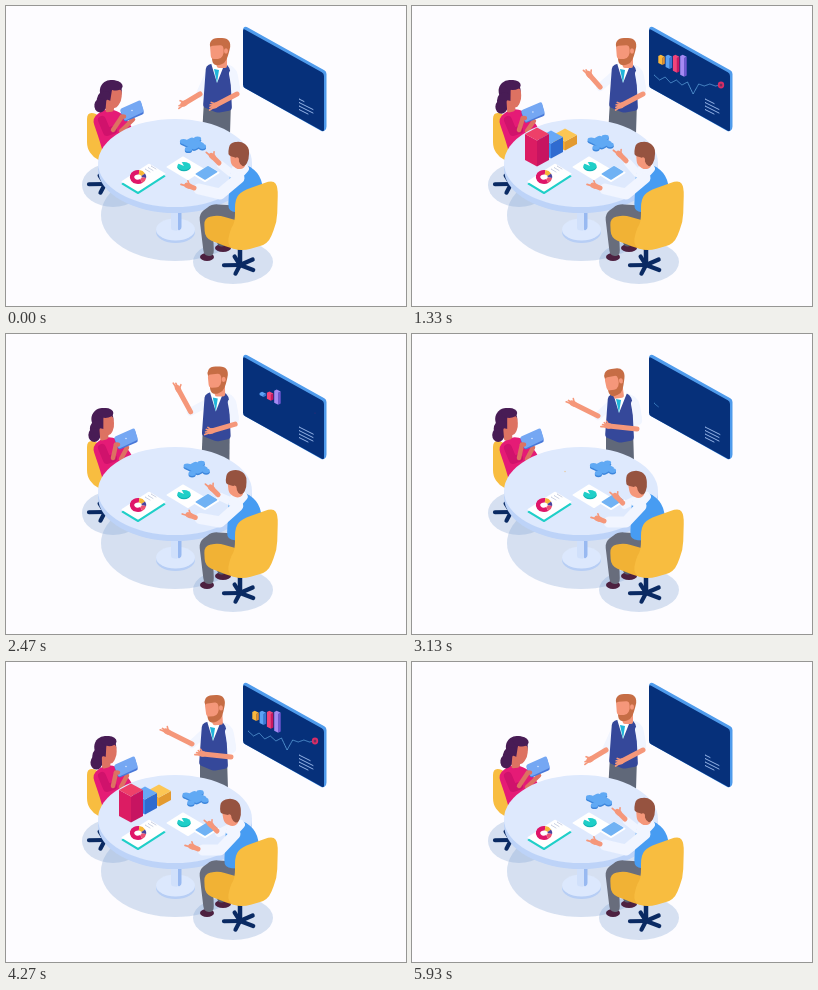
Animation, 400 px wide and 300 px high, one loop 6000 ms. Source, as an HTML page with a canvas:

```html
<!DOCTYPE html>
<html lang="en">
<head>
<meta charset="utf-8">
<title>Team meeting</title>
<style>
html, body { margin: 0; width: 100%; height: 100%; overflow: hidden; background: #fdfcff; }
canvas { display: block; width: 400px; height: 300px; }
</style>
</head>
<body>
<canvas id="stage"></canvas>
<script>
const LOOP = 6000, CHART_LOOP = 3000, TAU = Math.PI * 2;
const canvas = document.getElementById('stage');
const ratio = window.devicePixelRatio || 1;
canvas.width = 400 * ratio;
canvas.height = 300 * ratio;
const ctx = canvas.getContext('2d');

const SKIN = '#f5977a', TAN = '#dd7262', WHITE = '#ffffff', SHIRT = '#f1f5ff';
const NAVY = '#0a2a63', YELLOW = '#f8bd40', BLUE = '#479cf2', TEAL = '#1fcfc8';
const HAIR = '#c66d45', PLUM = '#481c55', BROWN = '#965340';

const clamp = v => Math.max(0, Math.min(1, v));
const smooth = v => v * v * (3 - 2 * v);
const ramp = (t, from, to) => smooth(clamp((t - from) / (to - from)));
const pulse = (t, on, full, fade, off) => ramp(t, on, full) * (1 - ramp(t, fade, off));
const mix = (a, b, k) => Array.isArray(a) ? a.map((v, i) => mix(v, b[i], k)) : a + (b - a) * k;

// Filled polygon whose corners are softened by r.
function shape(color, r, ...points) {
  const toward = (p, q) => mix(p, q, Math.min(.5, r / Math.hypot(q[0] - p[0], q[1] - p[1])));
  const n = points.length;
  ctx.beginPath();
  points.forEach((p, i) => {
    ctx.lineTo(...toward(p, points[(i + n - 1) % n]));
    ctx.quadraticCurveTo(...p, ...toward(p, points[(i + 1) % n]));
  });
  ctx.closePath();
  ctx.fillStyle = color;
  ctx.fill();
}

function oval(x, y, rx, ry, color) {
  ctx.beginPath();
  ctx.ellipse(x, y, rx, ry, 0, 0, TAU);
  ctx.fillStyle = color;
  ctx.fill();
}

function stroke(width, color, ...points) {
  ctx.beginPath();
  points.forEach(p => ctx.lineTo(...p));
  ctx.lineWidth = width;
  ctx.lineCap = ctx.lineJoin = 'round';
  ctx.strokeStyle = color;
  ctx.stroke();
}

function at(x, y, turn, draw) {
  ctx.save();
  ctx.translate(x, y);
  ctx.rotate(turn);
  draw();
  ctx.restore();
}

// Flat sheet on the table: a runs up to the right, b down to the right.
function sheet(x, y, a, b, color) {
  shape(color, 1, [x, y], [x + a, y - a * .64], [x + a + b, y - a * .64 + b * .6], [x + b, y + b * .6]);
}

function forearm(elbow, wrist, color, fingers) {
  stroke(5, color, elbow, wrist);
  const angle = Math.atan2(wrist[1] - elbow[1], wrist[0] - elbow[0]);
  at(...wrist, angle, () => {
    oval(1, 0, 4, 2.8, color);
    for (let i = 0; i < fingers; i++)
      stroke(1.7, color, [2, i - 1], [8 - i * 1.5, i * 2.2 - 1.5]);
    stroke(1.6, color, [0, 1], [3, 4.5]);
  });
}

function chairBase(x, y) {
  stroke(4.5, NAVY, [x, y - 17], [x, y]);
  for (let i = 0; i < 5; i++) {
    const a = .6 + i * TAU / 5;
    stroke(4.2, NAVY, [x, y], [x + 16 * Math.cos(a), y + 9 * Math.sin(a)]);
  }
}

// Screen

const HEIGHTS = [69, 74, 71, 77, 74, 79, 76, 88, 78, 80, 78, 80, 79];

function chartPoint(u) {
  const pos = u * (HEIGHTS.length - 1), i = Math.min(Math.floor(pos), HEIGHTS.length - 2);
  return [242 + 67 * u, mix(HEIGHTS[i], HEIGHTS[i + 1], pos - i)];
}

function bars(c) {
  const colors = [['#fbb83c', '#e58e2c'], ['#5ba2f5', '#3b75d4'], ['#f2457a', '#cb175f'], ['#a58af3', '#7257d2']];
  colors.forEach(([front, side], i) => {
    const grown = pulse(c, 150 + i * 40, 800 + i * 60, 2180 + i * 50, 2500 + i * 60);
    const x = 246.3 + i * 7.3, y = 57 + i * 3.9, top = y - (7 + i * 3.9) * grown;
    if (grown < .03) return;
    shape(side, 0, [x + 4, y + 2], [x + 6.5, y + .8], [x + 6.5, top + .8], [x + 4, top + 2]);
    shape(front, 0, [x, y], [x + 4, y + 2], [x + 4, top + 2], [x + 6.5, top + .8], [x + 2.5, top - 1.2], [x, top]);
  });
}

function screen(t, c) {
  shape('#4f9bec', 2.5, [237, 21.5], [240, 20.5], [320.5, 65.5], [320.5, 123], [317, 126], [237, 81]);
  shape('#06307a', 2.5, [237, 22.5], [318, 67.5], [318, 126], [237, 81]);
  bars(c);

  const head = clamp((c - 90) / 660), tail = clamp((c - 1760) / 680);
  if (head > tail) {
    const points = [];
    for (let i = 0; i <= 96; i++) points.push(chartPoint(mix(tail, head, i / 96)));
    stroke(.8, '#5fa3dc', ...points);
  }
  const dot = pulse(c, 730, 900, 2350, 2500);
  if (dot) {
    oval(309, 79, 3.2 * dot, 3.4 * dot, '#d82d67');
    oval(309, 79, 1.4 * dot, 1.5 * dot, '#71305f');
  }

  for (let i = 0; i < 4; i++) {
    const y = 93 + i * 3.5;
    const w = i === 0 ? 10 - 5 * Math.cos(t / LOOP * TAU) : i === 3 ? 9 : 14;
    stroke(.9, '#a3c1f2', [293, y], [293 + w, y + w * .5]);
  }
}

// People

function presenter(t) {
  const up = pulse(t, 1000, 1600, 2250, 2850), side = pulse(t, 2250, 2850, 4450, 5050);
  const pose = (low, high, left) => low.map((v, i) => v + (high[i] - v) * up + (left[i] - v) * side);
  const dx = -4 * side, dy = 2 * side;
  const elbow = pose([194, 88], [184, 76], [186, 82]);

  shape('#606879', 0, [198 + dx, 95], [225 + dx, 95], [224 + dx / 2, 128], [196 + dx / 2, 128]);
  stroke(8, SHIRT, [203 + dx, 68 + dy], elbow);
  forearm(elbow, pose([179, 97], [177, 49], [162, 70]), SKIN, 2);

  at(dx, dy, 0, () => {
    shape(SHIRT, 6, [200, 60], [222, 57], [231, 64], [235, 88], [225, 91], [200, 84]);
    shape('#35489a', 3, [200, 60], [207, 57], [219, 57], [224, 62], [226, 104], [212, 107], [197, 101]);
    shape(WHITE, 0, [205, 57], [219, 57], [211, 77]);
    shape('#20b5da', 0, [208, 63], [213, 64], [211, 77]);
    stroke(8, SHIRT, [227, 68], [230, 84]);
  });
  forearm(mix([231, 88], [225, 95], side), mix([210, 99], [197, 92], side), SKIN, 3);

  const lean = side * (8 + 3 * Math.cos((t - 3130) / 365));
  at(213 - lean, 45 + lean * .25, -lean * .012, () => {
    shape(SKIN, 2, [-4, 6], [8, 5], [8, 17], [-2, 17]);
    shape(HAIR, 5, [-10, -7], [-6, -13], [8, -13], [12, -7], [9, 5], [6, 12], [-2, 15], [-7, 12], [-7, 0]);
    shape(SKIN, 3, [-9, -5], [4, -6], [5, 2], [2, 8], [-8, 8]);
    oval(7, 0, 2, 2.7, SKIN);
  });
}

function woman(t) {
  // Her gestures mirror around the start of the loop.
  const u = Math.min(t, LOOP - t);
  const hx = 105 - 8 * ramp(u, 100, 700) + 3 * ramp(u, 900, 1750) - 5 * ramp(u, 1900, 3000);
  const lowered = pulse(u, 150, 620, 850, 1500);
  const lean = ramp(hx, 97, 105);
  const x = 119 + 6 * Math.max(1 - ramp(u, 100, 1700), lowered * .9), y = 104.5 + 9 * lowered;

  chairBase(99, 178);
  shape(YELLOW, 6, [81, 107], [90, 107], [100, 118], [100, 158], [87, 151], [81, 142]);
  shape('#e51b76', 7, [86, 112], [100, 102], [115, 106], [128, 124], [122, 150], [98, 150], [94, 136]);
  at(hx, 90, lean * .16, () => {
    oval(-1, -5, 11, 11, PLUM);
    oval(-6, 5, 7.5, 9, PLUM);
    oval(-9, 11, 6, 7, PLUM);
    shape(TAN, 2, [-4, 4], [5, 6], [5, 15], [-3, 17]);
    shape(TAN, 4, [0, -9], [10, -8], [11, 3], [7, 12], [0, 10]);
    oval(2, -11, 8, 5, PLUM);
  });

  stroke(8, '#d0126c', [96, 114], [101, 126], [107, 124]);
  stroke(4.5, TAN, [107, 124], [x - 9, y + 6]);
  stroke(4.5, TAN, [115, 125], [x + 2, y + 9]);
  at(x, y, lowered * .14 - .06, () => {
    shape('#4978d8', 2, [-11, -1], [10, -9], [13, 4], [-7, 11]);
    shape('#75a7f3', 2, [-11, -2], [10, -10], [13, 2], [-7, 10]);
    oval(1, 0, .8, .8, '#d8e7ff');
  });
  oval(x - 8, y + 6, 3.2, 2.3, TAN);
}

function seatedMan(t) {
  const write = pulse(t, 2250, 2850, 5300, 5850);
  const wave = pulse(t, 200, 670, 1000, 1700);
  const scribble = Math.sin(t / 500 * Math.PI) * write;
  const lean = -4 * write;

  oval(201, 251, 7, 4, '#4d2140');
  oval(217, 242, 8, 4, '#4d2140');
  shape('#555c6e', 5, [211, 208], [240, 204], [240, 220], [222, 224], [219, 241], [211, 240]);
  shape('#686d7c', 6, [193, 208], [206, 198], [235, 200], [236, 218], [207, 222], [208, 250], [198, 250]);

  const handR = mix([207 + wave * 2, 151 - wave * 4], [204 + scribble, 163], write);
  stroke(8, SHIRT, [225 + lean, 167], [handR[0] + 8, handR[1] + 8]);
  forearm([handR[0] + 6, handR[1] + 6], handR, SKIN, 1);

  at(lean, 0, 0, () => {
    shape(BLUE, 8, [224, 164], [238, 157], [252, 166], [258, 182], [256, 207], [222, 206]);
    shape(SHIRT, 3, [226, 160], [240, 157], [244, 163], [236, 172], [223, 172]);
  });
  const handL = mix([183, 180], [187, 185], write);
  stroke(11, SHIRT, [233 + lean, 172], [214, 188], [handL[0] + 10, handL[1] + 3]);
  forearm([handL[0] + 5, handL[1] + 2], handL, SKIN, 1);

  at(232 - 8 * write, 149 + write, -.1 * write, () => {
    shape(SKIN, 4, [-8, -2], [5, -2], [8, 12], [1, 15], [-7, 10]);
    shape(BROWN, 5, [-10, -3], [-8, -12], [3, -14], [11, -8], [11, 4], [7, 12], [2, 10], [0, 3], [-9, 1]);
    oval(-1, 5, 2, 2.8, SKIN);
  });

  chairBase(234, 259);
  shape('#f1b235', 7, [198, 212], [212, 209], [236, 216], [240, 244], [226, 243], [199, 232]);
  shape(YELLOW, 9, [229, 193], [236, 185], [267, 174], [272, 181], [271, 216], [262, 238], [236, 245],
    [221, 241], [224, 224], [229, 216]);
}

// Table

function box(x, y, size, h, [top, left, right]) {
  if (size < .02) return;
  const w = 12 * size, d = 6.5 * size;
  shape(left, 0, [x - w, y], [x, y + d], [x, y + d - h], [x - w, y - h]);
  shape(right, 0, [x + w, y], [x, y + d], [x, y + d - h], [x + w, y - h]);
  shape(top, 0, [x - w, y - h], [x, y - d - h], [x + w, y - h], [x, y + d - h]);
}

function blocks(c) {
  const kinds = [
    [9, ['#fcc654', '#f2a735', '#e39a30']],
    [15, ['#67a8f6', '#4088e9', '#2f6bd0']],
    [26, ['#ee4069', '#dc1c63', '#c71461']]
  ];
  kinds.forEach(([full, colors], i) => {
    const size = pulse(c, 100 + i * 100, 420 + i * 100, 1770 + i * 190, 2020 + i * 190);
    const rise = pulse(c, 280 + i * 120, 620 + i * 190, 1700 + i * 60, 1980 + i * 120);
    box(153 - i * 14, 138 + i * 8, size, 1 + (full - 1) * rise, colors);
  });
}

function puzzle(t) {
  const lift = (1 - Math.cos(t / LOOP * TAU)) / 2;
  const piece = color => {
    shape(color, 2, [-12, -1], [-1, -7], [12, 0], [1, 6]);
    for (let i = 0; i < 4; i++) {
      const a = .45 + i * TAU / 4;
      oval(10.5 * Math.cos(a), 5.8 * Math.sin(a), 3.6, 2.4, color);
    }
  };
  at(187 + 4 * lift, 139.5 - 4 * lift, 0, () => piece('#3d86dc'));
  at(187 + 4 * lift, 138 - 4 * lift, 0, () => piece('#60a9f4'));
}

function papers() {
  sheet(115, 178, 28, 17, TEAL);
  sheet(115, 175.5, 28, 17, WHITE);
  let angle = -.4;
  for (const [color, part] of [['#df1669', .62], ['#f6b739', .14], ['#4a439c', .1], ['#ee5273', .14]]) {
    ctx.beginPath();
    ctx.ellipse(132, 171, 6, 4.8, 0, angle + 1.4, angle + 1.4 + part * TAU);
    ctx.lineCap = 'butt';
    ctx.strokeStyle = color;
    ctx.lineWidth = 4.4;
    ctx.stroke();
    angle += part * TAU;
  }
  for (let i = 0; i < 3; i++)
    stroke(.7, '#b7bfd7', [139 + i * 3, 163 - i * 1.5], [144 + i * 3, 166 - i * 1.5]);

  sheet(160, 161, 17, 22, WHITE);
  oval(178, 161.2, 6.6, 4, '#12b3b3');
  oval(178, 160, 6.6, 4, TEAL);
  shape(WHITE, 0, [178, 160], [171, 157], [175, 155]);

  sheet(187, 169, 15, 12, WHITE);
  sheet(189, 168, 13, 10, '#70b2f4');
}

function table(t, c) {
  oval(169.5, 226, 19.5, 11, '#b7cef5');
  oval(169.5, 223.5, 19.5, 11, '#dce8fd');
  shape('#d0e0fb', 2, [165, 195], [172, 195], [172, 225], [165, 224]);
  shape('#98b9f1', 2, [172, 195], [175.5, 195], [175.5, 223], [172, 225]);
  oval(169, 163, 77, 44, '#bdd3f8');
  oval(169, 157, 77, 44, '#dee9fd');
  puzzle(t);
  papers();
  blocks(c);
}

function shadows() {
  const tint = 'rgba(130, 165, 210, .32)';
  oval(107, 179, 31, 22, tint);
  oval(169, 209, 74, 46, tint);
  oval(227, 256, 40, 22, tint);
}

function frame() {
  const t = (performance.now() - start) % LOOP, c = t % CHART_LOOP;
  ctx.setTransform(ratio, 0, 0, ratio, 0, 0);
  ctx.fillStyle = '#fdfcff';
  ctx.fillRect(0, 0, 400, 300);
  shadows();
  screen(t, c);
  presenter(t);
  woman(t);
  table(t, c);
  seatedMan(t);
  requestAnimationFrame(frame);
}

const start = performance.now();
frame();
</script>
</body>
</html>
```
